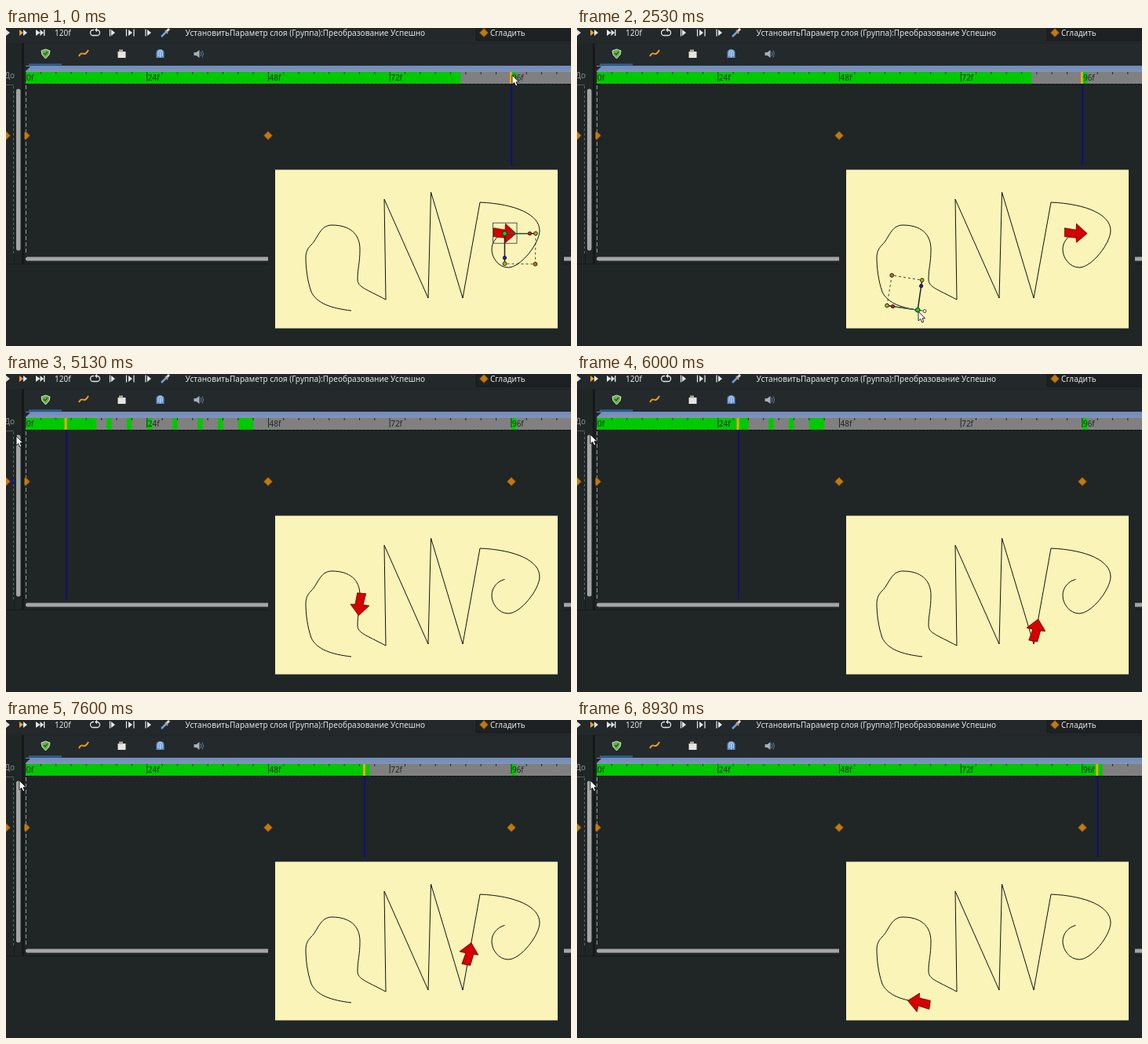
An HTML page for the animation above (8990 ms loop, 720 px wide and 405 px high).

```html
<!DOCTYPE html>
<html lang="ru">
<head>
<meta charset="utf-8">
<title>Стрелка вдоль кривой</title>
<style>
  html, body { margin: 0; width: 100%; height: 100%; overflow: hidden; background: #202526; }
  svg { display: block; width: 100vw; height: 100vh; }
  text { font: 10px "Noto Sans", sans-serif; fill: #e4e6e6; }
  #labels text { fill: #1c2a1c; }
  .icon { fill: none; stroke: #e4e6e6; stroke-width: 1.3; }
  .solid { fill: #e4e6e6; }
  .diamond { fill: #c07a14; stroke: #6b430c; stroke-width: .8; }
  .dash { fill: none; stroke: #222; stroke-width: .8; stroke-dasharray: 3 3; }
  .dot circle { stroke: #222; stroke-width: .9; }
</style>
</head>
<body>
<svg viewBox="0 0 720 405" preserveAspectRatio="none">
  <defs>
    <path id="dia" class="diamond" d="M0-5.5 5.5 0 0 5.5-5.5 0Z"/>
    <clipPath id="track"><rect x="23.5" y="48" width="697" height="240"/></clipPath>
    <linearGradient id="strip" x2="0" y2="1">
      <stop stop-color="#6d8cc0"/><stop offset="1" stop-color="#8293b4"/>
    </linearGradient>
  </defs>

  <!-- Toolbar -->
  <rect width="720" height="405" fill="#202526"/>
  <rect width="720" height="19" fill="#23282a"/>
  <rect x="599" y="-3" width="124" height="19" fill="#1d2123" stroke="#171a1b"/>
  <g class="solid">
    <path d="M0 2 5 6 0 10Z"/>
    <path d="M17 2 22 6 17 10Z" fill="#f0a030"/><path d="M22 2 27 6 22 10Z"/>
    <path d="M38 2 43.500 6 38 10ZM43.500 2 48 6 43.500 10ZM48 2h1.400v8H48Z"/>
    <path d="M134 2 139 6 134 10ZM156 2 161 6 156 10ZM180 2 185 6 180 10Z"/>
  </g>
  <path class="icon" d="M112 2.500h-1a3.500 3.500 0 0 0 0 7h1M115 2.500h1a3.500 3.500 0 0 1 0 7h-4M116 .5 114 2.500l2 2M132.500 1.500v9M153.500 1.500v9M163 1.500v9M178 1.500v9"/>
  <path d="M198 11 205 4" stroke="#66a4e0" stroke-width="2.500"/>
  <path d="M203 3 206 7" stroke="#e88a70" stroke-width="2"/>
  <path d="M205 4 208 1" stroke="#c8d8ec" stroke-width="3"/>
  <text x="62" y="10">120f</text>
  <text x="228.500" y="10">УстановитьПараметр слоя (Группа):Преобразование Успешно</text>
  <use href="#dia" x="609" y="6"/>
  <text x="617" y="10">Сгладить</text>

  <!-- Tabs -->
  <rect x="23" y="20" width="697" height="28" fill="#24292b"/>
  <rect x="29" y="45.500" width="42" height="2" fill="#2c6ba5"/>
  <path d="M45 29 50.500 27 56 29 55 34 50.500 39 46 34Z" fill="#69b34c" stroke="#cfe5c6"/>
  <path d="M48 32l2 2 3-4" fill="none" stroke="#24551d" stroke-width="1.300"/>
  <path d="M93 36C97 27 99 39 105 28" fill="none" stroke="#f09a20" stroke-width="2"/>
  <path d="M142.500 30h10v8h-10Z" fill="#e6e5df"/><path d="M144 27.500h5v3h-5Z" fill="#aaa99f"/>
  <path d="M191.500 38v-7a5 4 0 0 1 10 0v7Z" fill="#5a92d0"/>
  <path class="icon" d="M194 36v-5a2.500 2.500 0 0 1 5 0v5M196.500 30v7" style="stroke-width:1"/>
  <path d="M239.500 31h3l4-3v10l-4-3h-3Z" fill="#a9afb1"/>
  <path d="M248 30q2 3 0 6M250 28.500q3 4.500 0 9" fill="none" stroke="#527fb0"/>

  <!-- Side panel -->
  <path d="M21.500 19v282" stroke="#15191a" stroke-width="3"/>
  <path d="M0 72.500h10" stroke="#555b5c"/>
  <text x="-2" y="64" style="fill:#8d9394">До</text>
  <path d="M9.500 74v214" stroke="#626969" stroke-dasharray="3 3"/>
  <path d="M10.500 287v13M0 300.500h720" stroke="#171b1c"/>
  <rect x="13" y="77.500" width="5.500" height="206" rx="2.700" fill="#a3a6a4"/>
  <use href="#dia" id="side" y="137"/>
  <rect id="mark" x="7.500" y="132" width="2" height="9" fill="#1010a8"/>

  <!-- Timeline -->
  <g clip-path="url(#track)">
    <rect x="25" y="48" width="695" height="8" fill="url(#strip)"/>
    <path d="M24 49h7l-6 6Z" fill="#20272c"/>
    <rect x="25" y="56" width="695" height="15" fill="#808080"/>
    <path id="green" fill="#00c900"/>
    <path id="ticks" stroke="#183018"/>
    <g id="labels"></g>
    <path d="M25 71.500H720" stroke="#0d1010" stroke-dasharray="3 2"/>
    <path d="M25.500 73v214" stroke="#969c9c" stroke-dasharray="5 3"/>
    <use href="#dia" x="25" y="137"/>
    <use href="#dia" x="334" y="137"/>
    <use href="#dia" id="key" x="644" y="137"/>
    <g id="now">
      <rect x="-2" y="56" width="3" height="15" fill="#f0a810"/>
      <path d="M.3 71V287" stroke="#0808a0" stroke-width="1.300"/>
    </g>
  </g>
  <rect x="25" y="291.500" width="720" height="5" rx="2.500" fill="#a3a6a4"/>

  <!-- Canvas window -->
  <rect x="334" y="175" width="377" height="230" fill="#202526"/>
  <rect x="343" y="180.500" width="360" height="202" fill="#faf4b8"/>
  <path id="curve" fill="none" stroke="#111" d="M440 360C415 357 396 351 389 336C384 322 382 305 382 292C382 284 386 279 389 276C397 269 400 251 415 251C438 251 451 262 451 282C451 300 448 306 448 320C448 330 458 332 484 346L482 218 538 344 541.500 209 582 344 604 222C650 224 680 238 680 258C680 274 656 305 640 305C628 305 619 293 619 282C619 272 626 264 635.500 261.500"/>
  <g id="arrowBox"><path id="arrow" fill="#d60000" stroke="#5a0000" stroke-width=".8" d="M-14-7 .5-4.500 1-12.500 14.500 0 1 11.500 .5 5.500-14 4Z"/></g>
  <rect id="bounds" fill="none" stroke="#444" stroke-width=".9"/>
  <g id="handles" class="dot">
    <path class="dash" d="M39.500 0 39 39 0 38.500"/>
    <path d="M0 38.500V0H39.500" fill="none" stroke="#222" stroke-width="1.500"/>
    <path d="M0 0H32" stroke="#3f8f50" stroke-width=".8"/>
    <circle cx="39.500" r="2.400" fill="#b0a820"/>
    <circle cx="32" r="2.200" fill="#d01818"/>
    <circle cx="39" cy="39" r="2.400" fill="#c46a10"/>
    <circle cy="38.500" r="2.400" fill="#b0a820"/>
    <circle cy="31" r="2.200" fill="#1818c8"/>
    <circle r="2.800" fill="#10d020"/>
  </g>
  <circle id="tip" cx="443" cy="360.500" r="2" fill="#f4f0d0" stroke="#333" stroke-width=".9"/>
  <path id="cursor" fill="#fff" stroke="#111" stroke-width=".9" d="M0 0V12L2.800 9.500 4.700 14 6.800 13 5 8.800H8.500Z"/>
</svg>
<script>
const $ = id => document.getElementById(id);
const LOOP = 8990, STEP = 6.447, REST = .0035;
const GRAB = 17, DROP = 42, SCRUB = 60, PLAY = 72;
const scrub = [44, 43, 42, 38, 34, 29, 24, 20, 16, 13, 6, 0];
const xOf = frame => 25 + frame * STEP;

// Mouse path: step, x, y
const mouse = [[0, 645, 60], [4, 645, 60], [13, 635, 262], [GRAB, 635, 262], [36, 435, 361],
  [DROP, 435, 361], [56, 314, 58], [SCRUB, 314, 58]];
const mouseEnd = [[71, 26, 60], [75, 13, 79], [78, 13, 79], [82, 17, 77]];

let ticks = '';
for (let f = 0; f <= 108; f += 3) {
  const major = f % 24 === 0;
  ticks += `M${xOf(f).toFixed(1)} 56v${major ? 12 : 3}`;
  if (major) $('labels').innerHTML += `<text x="${xOf(f) + 1}" y="67">${f}f</text>`;
}
$('ticks').setAttribute('d', ticks);

const curve = $('curve'), total = curve.getTotalLength();
const at = s => curve.getPointAtLength(s * total);
const samples = Array.from({ length: 401 }, (_, i) => ({ s: i / 400, p: at(i / 400) }));

function nearest(x, y) {
  const gap = ({ p }) => Math.hypot(p.x - x, p.y - y);
  return Math.max(REST, samples.reduce((a, b) => gap(b) < gap(a) ? b : a).s);
}

function track(keys, n) {
  const i = keys.findIndex(k => k[0] > n);
  if (i < 0) return keys[keys.length - 1].slice(1);
  if (i === 0) return keys[0].slice(1);
  const [a, b] = [keys[i - 1], keys[i]];
  const t = (n - a[0]) / (b[0] - a[0]), e = t * t * (3 - 2 * t);
  return [a[1] + (b[1] - a[1]) * e, a[2] + (b[2] - a[2]) * e];
}

// Share of the curve covered: out until 48, back until 96
function share(frame) {
  const t = Math.max(0, 1 - Math.abs(frame - 48) / 48);
  const h = t + t * t - t * t * t;
  return frame > 48 ? REST + (1 - REST) * h : h;
}

function pose(s) {
  const p = at(s);
  if (s >= 1) return `translate(635.5 261.7)`;
  const a = at(Math.max(0, s - .0008)), b = at(s + .0008);
  const angle = Math.atan2(b.y - a.y, b.x - a.x) * 180 / Math.PI;
  return `translate(${p.x} ${p.y}) rotate(${angle})`;
}

function cells(n, frame) {
  const list = [[96, 97]];
  if (n < DROP) list.push([0, 86]);
  if (n >= SCRUB) {
    scrub.slice(0, n - SCRUB + 1).forEach(f => list.push([f, f + 1]));
    if (frame < 13 || n >= PLAY) list.push([n < PLAY ? frame : 0, Math.max(13, frame) + 1]);
  }
  return list.map(([a, b]) => `M${xOf(a)} 56H${xOf(b)}V71H${xOf(a)}Z`).join('');
}

const show = (id, on) => $(id).style.display = on ? '' : 'none';
const place = (id, value) => $(id).setAttribute('transform', value);

function draw(n) {
  const frame = n < SCRUB ? 96 : n < PLAY ? scrub[n - SCRUB] : Math.floor((n - PLAY) * 1.6 + 1e-6);
  const dragging = n >= GRAB && n < DROP;
  let [mx, my] = track(n < 71 ? mouse : mouseEnd, n);
  if (n >= SCRUB && n < 71) mx = xOf(frame) + 4;

  const s = n < DROP ? 1 : share(frame);
  place('arrow', pose(s));
  place('handles', pose(dragging ? nearest(mx, my) : s));
  show('handles', n < PLAY);
  show('bounds', n < PLAY && !dragging);
  show('tip', dragging && n >= 34);
  const box = $('arrowBox').getBBox();
  Object.entries({ x: box.x - 1, y: box.y - 1, width: box.width + 2, height: box.height + 2 })
    .forEach(([k, v]) => $('bounds').setAttribute(k, v));

  $('green').setAttribute('d', cells(n, frame));
  place('now', `translate(${xOf(frame)} 0)`);
  show('key', n >= DROP);
  show('mark', n >= 74 && n < 82);
  $('side').style.fill = n >= DROP && n < PLAY ? '#a09018' : '';
  place('cursor', `translate(${mx} ${my})`);
}

// Picture changes fifteen times a second, on whole hundredths
const start = performance.now();
let last = -1;
function tick() {
  const t = (performance.now() - start) % LOOP;
  const n = Math.min(134, Math.ceil((Math.floor(t / 10) + .5) * .15) - 1);
  if (n !== last) draw(last = n);
  requestAnimationFrame(tick);
}
tick();
</script>
</body>
</html>
```
